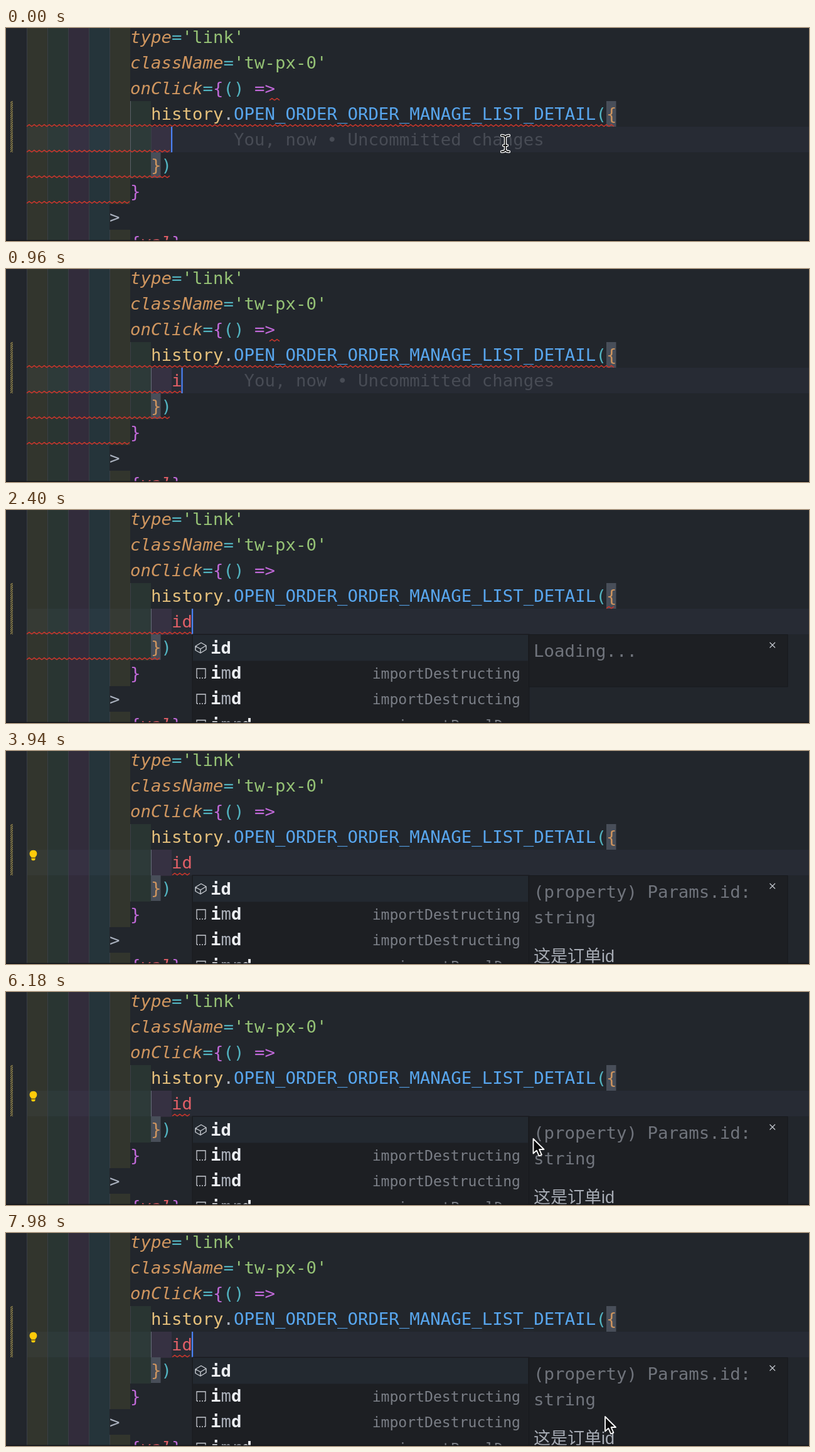
An HTML page that plays this animation: 1280 by 341 pixels, repeating every 8 s.

```html
<!DOCTYPE html>
<html lang="en">
<head>
<meta charset="utf-8">
<title>Editor autocomplete</title>
<style>
  html, body { margin: 0; width: 100%; height: 100%; overflow: hidden; background: #22262c; }
  svg { display: block; width: 1280px; height: 341px; }
  text {
    font: 27.4px 'DejaVu Sans Mono', monospace;
    font-variant-ligatures: none;
    white-space: pre;
  }
  .it { font-style: italic; }
  .b { font-weight: bold; fill: #eceef2; }
  .label { font-size: 23.1px; fill: #7a7e86; text-anchor: end; }
  .doc { font-family: 'Liberation Sans', 'Noto Sans CJK SC', 'Noto Sans CJK', sans-serif; font-size: 27px; }
</style>
</head>
<body>
<svg id="stage" viewBox="0 0 1280 341" xmlns="http://www.w3.org/2000/svg"></svg>
<script>
const LOOP = 8000, CHAR = 16.5, LEFT = 33, ROW = 41.1, FIRST = -6;
const C = {
  bg: '#22262c', line: '#272b34', panel: '#1d1f23', gray: '#abb2bf', dim: '#484c55', doc: '#70747c',
  orange: '#d0965f', cyan: '#52b3c0', green: '#95c275', purple: '#c169d9',
  yellow: '#e5c07b', blue: '#58a6ee', red: '#e25f67', wave: '#c4362c'
};
const TINTS = ['255,255,64', '127,255,127', '255,127,255', '79,236,236'];
const AT = {
  hover: 500, typeI: 900, typeD: 1060, popup: 1640, details: 1900,
  loaded: 2800, bulb: 3400, arrow: 4400
};
const BLINK = 1100;

const col = n => LEFT + n * CHAR;
const rowTop = r => FIRST + r * ROW;
const base = r => 23.6 + r * 41.15;
const rect = (x, y, w, h, fill, more = '') =>
  `<rect x="${x}" y="${y}" width="${w}" height="${h}" fill="${fill}" ${more}/>`;
const group = (id, body, more = '') => `<g id="${id}" ${more}>${body}</g>`;
const esc = s => s.replace(/&/g, '&amp;').replace(/</g, '&lt;').replace(/>/g, '&gt;');
const text = (x, y, s, fill, cls = '') =>
  `<text x="${x}" y="${y}" fill="${fill}" class="${cls}">${esc(s)}</text>`;

// Coloured code: parts are [string, colour, class], one column per character
function code(r, c, parts) {
  let out = '';
  for (const [s, fill, cls] of parts) {
    out += text(col(c), base(r), s, fill, cls);
    c += s.length;
  }
  return out;
}

function wave(x1, x2, y) {
  let d = `M${x1} ${y + 1.6}`;
  for (let x = x1 + 4, up = true; x <= x2; x += 4, up = !up) d += `L${x} ${up ? y - 1.4 : y + 1.6}`;
  return `<path d="${d}" fill="none" stroke="${C.wave}" stroke-width="1.5" stroke-linejoin="round"/>`;
}

function indents() {
  const depth = [5, 5, 5, 6, 7, 6, 5, 4, 5];
  let out = '';
  depth.forEach((n, r) => {
    for (let i = 0; i < n; i++) {
      const x = col(2 * i);
      out += rect(x, rowTop(r), 33, ROW, `rgba(${TINTS[i % 4]},.07)`, 'shape-rendering="crispEdges"');
      out += rect(x, rowTop(r), 1, ROW, '#3a3f47', 'shape-rendering="crispEdges"');
    }
  });
  return out;
}

function hatch() {
  let d = '';
  for (let y = 114; y < 202; y += 3.4) d += `M6 ${y + 4}L12 ${y - 2}`;
  return `<clipPath id="gutter">${rect(7, 117, 4, 82, '#000')}</clipPath>
    <path d="${d}" stroke="#a1904f" stroke-width="1.2" clip-path="url(#gutter)"/>`;
}

function hoverBox() {
  return `<clipPath id="hoverClip">${rect(33, 0, 1147, 157.5, '#000')}</clipPath><g clip-path="url(#hoverClip)">` +
    rect(33, 0, 1147, 158, '#20242a') +
    text(46, 29.5, "'Params'.", C.gray) +
    text(46, 70.5, "  Property 'id' is missing in type '{}' but required in type", C.gray) +
    text(46, 111.5, "'Params'.", C.gray) +
    text(199, 111.5, 'ts(2345)', '#7d828c') +
    text(46, 162, "page.params.ts(4, 3): 'id' is declared here.", '#4c96e0') + '</g>';
}

function snippet(y, name, label) {
  let out = `<path d="M304 ${y + 15}V${y}H318V${y + 15}" fill="none" stroke="#c8ccd2" stroke-width="1.3"/>
    <path d="M304 ${y + 15}H319" stroke="#c8ccd2" stroke-width="1.6" stroke-dasharray="2 2"/>`;
  [...name].forEach((ch, i) => {
    const hit = i === 0 || i === name.length - 1;
    out += text(326 + i * CHAR, y + 16, ch, '#a9aeb8', hit ? 'b' : '');
  });
  return out + text(820, y + 16, label, '', 'label');
}

function popup() {
  return rect(297, 199, 537, 150, C.panel, 'stroke="#181a1e"') +
    rect(298, 200, 534, 41.5, '#232930') +
    `<path d="M302 218L311 212.5L319 217V223.5L310 229L302 224.5ZM302 218L310 222.5L319 217M310 222.5V229"
      fill="none" stroke="#c8ccd2" stroke-width="1.4" stroke-linejoin="round"/>` +
    text(326, 229.5, 'id', '', 'b') +
    snippet(254, 'imd', 'importDestructing') +
    snippet(295, 'imd', 'importDestructing') +
    snippet(336.5, 'imrd', 'importPanelDom');
}

function details() {
  return rect(833.5, 199.5, 412.5, 83.5, C.panel, 'id="card" stroke="#17191d"') +
    '<path d="M1217.5 212L1226 220.5M1226 212L1217.5 220.5" stroke="#c3c7ce" stroke-width="1.3"/>' +
    group('loading', text(841, 235, 'Loading...', C.doc)) +
    group('docs',
      text(841, 235, '(property) Params.id:', C.doc) +
      text(841, 276, 'string', C.doc) +
      text(841, 338, '这是订单id', '#a7acb5', 'doc'));
}

const BULB = `<path d="M40.5 170C36 167 36.5 158.8 43.5 158.8S51 167 46.5 170V173.5
  Q46.5 175.3 43.5 175.3T40.5 173.5Z" fill="#ffca0a"/>
  <path d="M40.5 171.2H46.5" stroke="#4a3d14" stroke-width="1.2"/>`;
const BEAM_PATH = 'M-6 -13Q-1 -13 0 -10Q1 -13 6 -13M0 -10V10M-6 13Q-1 13 0 10Q1 13 6 13M-3 3H3';
const BEAM = `<g fill="none" stroke-linecap="round"><path d="${BEAM_PATH}" stroke="#fff" stroke-width="4.4"/>
  <path d="${BEAM_PATH}" stroke="#111" stroke-width="1.8"/></g>`;
const ARROW = `<path d="M0 0V23.5L5.3 18.6L9.2 27.5L13.4 25.7L9.6 17H17Z"
  fill="#0b0b0c" stroke="#fff" stroke-width="1.8" stroke-linejoin="round"/>`;

document.getElementById('stage').innerHTML =
  rect(0, 0, 1280, 341, C.bg) +
  rect(33, 158, 1247, 41, C.line) +
  indents() + hatch() +
  rect(198, 117, 1, 123, '#596069', 'id="guideOuter"') +
  rect(231, 158, 1, 41, '#666d78', 'id="guideInner"') +
  rect(957, 117, 15.5, 41, '#484e59') +
  rect(231, 199, 15.5, 41, '#484e59') +
  code(0, 10, [['type', C.orange, 'it'], ['=', C.cyan], ["'link'", C.green]]) +
  code(1, 10, [['className', C.orange, 'it'], ['=', C.cyan], ["'tw-px-0'", C.green]]) +
  code(2, 10, [['onClick', C.orange, 'it'], ['=', C.cyan], ['{', C.purple], ['() ', C.cyan], ['=>', C.purple]]) +
  code(3, 12, [['history', C.yellow], ['.', C.gray], ['OPEN_ORDER_ORDER_MANAGE_LIST_DETAIL', C.blue],
    ['(', C.cyan], ['{', C.orange]]) +
  group('typed', text(col(14), base(4), '', C.red)) +
  group('blame', text(0, base(4), 'You, now • Uncommitted changes', C.dim)) +
  code(5, 12, [['}', C.orange], [')', C.cyan]]) +
  code(6, 10, [['}', C.purple]]) +
  code(7, 8, [['>', C.gray]]) +
  code(8, 10, [['{', C.purple], ['val', C.red, 'it'], ['}', C.purple]]) +
  group('wavesSyntax', wave(420, 436, 114) + wave(33, 972, 156) + wave(33, 263, 238) + wave(33, 197, 279)) +
  group('waveEmpty', wave(33, 264, 197)) +
  group('waveTyped', wave(33, 281, 197)) +
  group('waveId', wave(33, 297, 197)) +
  group('wavesObject', wave(957, 972, 156) + wave(33, 246, 238)) +
  group('waveName', wave(265, 296, 197)) +
  rect(33, 158, 231, 39, 'rgba(66,132,205,.27)', 'id="range"') +
  group('hover', hoverBox()) +
  group('bulb', BULB) +
  rect(0, 158, 2.2, 41, '#4b82f5', 'id="caret"') +
  group('popup', popup()) +
  group('details', details()) +
  group('beam', BEAM, 'transform="translate(796 185)"') +
  group('arrow', ARROW) +
  rect(0, 339.5, 1280, 1.5, '#121418');

const el = id => document.getElementById(id);
const show = (id, on) => { el(id).style.display = on ? '' : 'none'; };

// Pointer stops: time, x, y
const PATH = [
  [4400, 806, 226], [4900, 842, 234], [5500, 862, 237], [6180, 840.5, 235],
  [6700, 880, 266], [7150, 966, 299], [7500, 958, 294], [8000, 955, 294]
];

function pointer(t) {
  let i = 0;
  while (i < PATH.length - 2 && t > PATH[i + 1][0]) i++;
  const [t0, x0, y0] = PATH[i], [t1, x1, y1] = PATH[i + 1];
  const k = Math.min(1, Math.max(0, (t - t0) / (t1 - t0)));
  const e = k * k * (3 - 2 * k);
  return [x0 + (x1 - x0) * e, y0 + (y1 - y0) * e];
}

function draw(t) {
  const word = t < AT.typeI ? '' : t < AT.typeD ? 'i' : 'id';
  const n = word.length;
  const hovering = t >= AT.hover && t < AT.typeI;
  const syntax = t < AT.popup;
  const loaded = t >= AT.loaded;

  el('typed').firstChild.textContent = word;
  el('caret').setAttribute('x', col(14 + n) - 1);
  show('caret', t < AT.typeD || (t - AT.typeD) % BLINK < BLINK / 2);
  el('blame').setAttribute('transform', `translate(${col(20 + n)} 0)`);
  show('blame', syntax);
  show('guideOuter', n === 0);
  show('guideInner', n > 0);

  show('wavesSyntax', syntax);
  show('waveEmpty', n === 0);
  show('waveTyped', n === 1);
  show('waveId', n === 2 && !loaded);
  show('wavesObject', !syntax && !loaded);
  show('waveName', loaded);

  show('range', hovering);
  show('hover', hovering);
  el('hover').setAttribute('opacity', Math.min(1, Math.max(0, (t - AT.hover) / 100)));

  show('popup', !syntax);
  show('details', t >= AT.details);
  el('card').setAttribute('height', loaded ? 150 : 83.5);
  show('loading', !loaded);
  show('docs', loaded);
  show('bulb', t >= AT.bulb);

  show('beam', n === 0);
  show('arrow', t >= AT.arrow);
  el('arrow').setAttribute('transform', `translate(${pointer(t).join(' ')})`);
}

const start = performance.now();
function tick(now) {
  draw(Math.max(0, now - start) % LOOP);
  requestAnimationFrame(tick);
}
draw(0);
requestAnimationFrame(tick);
</script>
</body>
</html>
```
